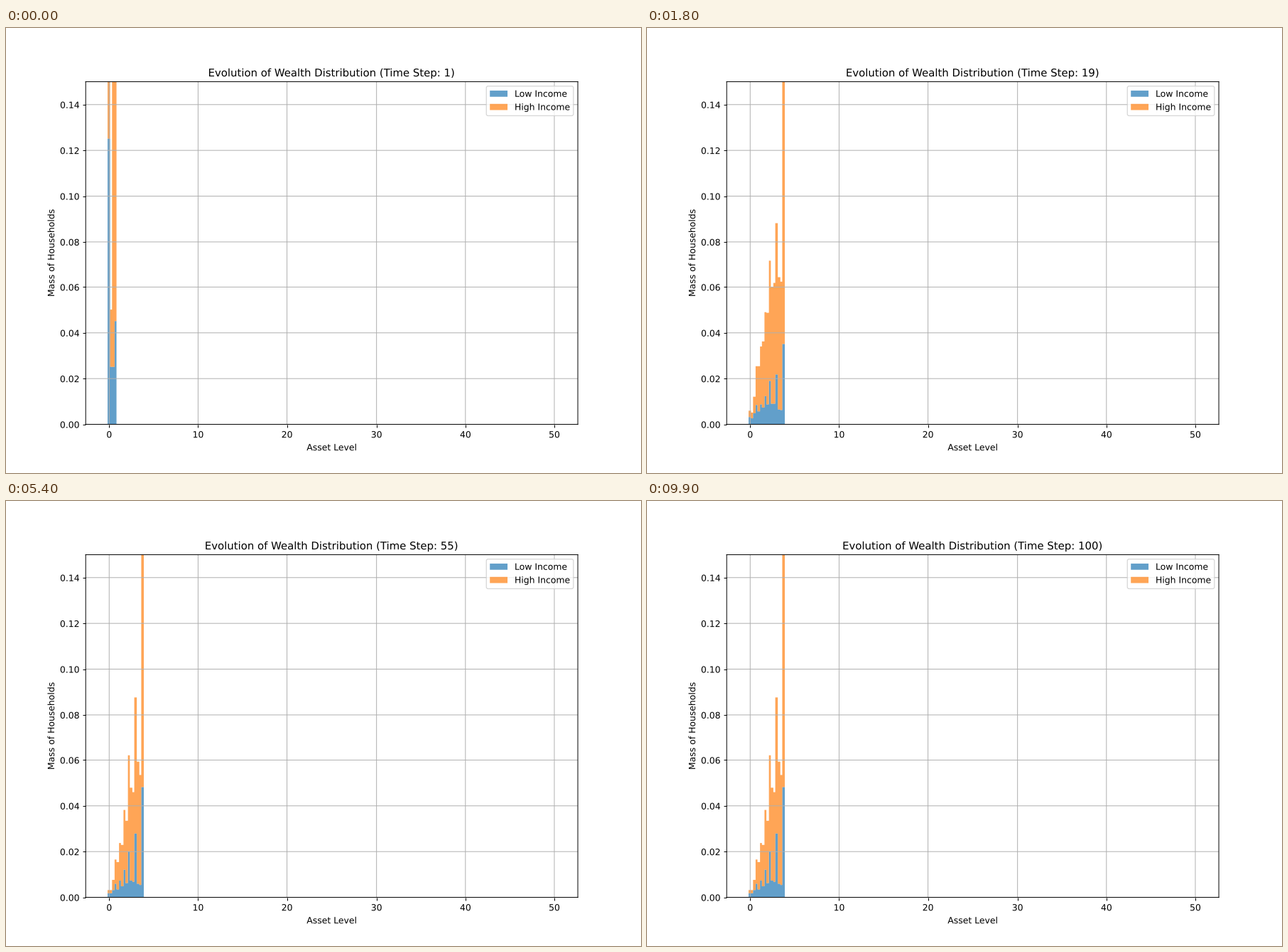
Animation, 894 px wide and 626 px high, one loop 10000 ms. Source, as a matplotlib script:

```python
import numpy as np
import matplotlib.pyplot as plt
from matplotlib.animation import FuncAnimation
from matplotlib.patheffects import Normal
from matplotlib.text import Text

W, H, DPI = 894, 626, 89.4
STEPS = 100

# Layout grid that edges and lines are aligned to before scaling to W x H
GRID_W, GRID_H = 1000, 700
LEFT, BOTTOM, AX_W, AX_H = 125, 77, 775, 539

XLIM = (-2.6375, 52.6375)
YLIM = (0, 0.15)

# Savings policies: next asset index for each current index
SAVE_LOW = np.array([0, 0, 1, 2, 3, 3, 4, 5, 6, 7, 8, 9, 9, 10, 11, 12])
SAVE_HIGH = np.array([2, 3, 3] + [min(i + 1, 15) for i in range(3, 16)])
INCOME = np.array([[0.5, 0.5], [0.1, 0.9]])  # rows: from low, from high
N = len(SAVE_LOW)


def advance(mass):
    """Move households along their savings policy, then redraw incomes."""
    saved = np.zeros_like(mass)
    np.add.at(saved[0], SAVE_LOW, mass[0])
    np.add.at(saved[1], SAVE_HIGH, mass[1])
    return INCOME.T @ saved


def simulate():
    mass = np.zeros((2, N))
    mass[:, 0] = 0.5
    mass = advance(mass)
    path = []
    for _ in range(STEPS):
        mass = advance(mass)
        path.append(mass)
    return path


def snap(value, lim, size, shift=0):
    """Align data values to whole steps of the layout grid."""
    unit = (lim[1] - lim[0]) / size
    return lim[0] + (np.round((value - lim[0]) / unit) + shift) * unit


def bar_tops(step):
    low, high = path[step]
    return [snap(v, YLIM, AX_H, 0.5) for v in (low, low + high)]


path = simulate()

plt.rcParams["font.family"] = "DejaVu Sans"
# the tiny surplus guards against the pixel size being truncated
fig = plt.figure(figsize=((W + 1e-6) / DPI, (H + 1e-6) / DPI), dpi=DPI)
# lines run through the middle of a grid cell, fills along its edges
ax = fig.add_axes([(LEFT + 0.5) / GRID_W, (BOTTOM - 0.5) / GRID_H,
                   AX_W / GRID_W, AX_H / GRID_H])

edges = snap((np.arange(N + 1) - 0.5) * 50 / 199, XLIM, AX_W, -0.5)
tops = bar_tops(0)
style = dict(fill=True, alpha=0.7, linewidth=0)
low_bars = ax.stairs(tops[0], edges, color="C0", label="Low Income", **style)
high_bars = ax.stairs(tops[1], edges, baseline=tops[0], color="C1",
                      label="High Income", **style)

ax.set(xlim=XLIM, ylim=YLIM, xlabel="Asset Level", ylabel="Mass of Households")
xticks = np.arange(0, 51, 10)
yticks = np.arange(0, 0.15, 0.02)
ax.set_xticks(snap(xticks, XLIM, AX_W), [f"{t}" for t in xticks])
ax.set_yticks(snap(yticks, YLIM, AX_H), [f"{t:.2f}" for t in yticks])
ax.grid(True)
ax.legend(loc="upper right", labelspacing=0.46)
title = ax.set_title("")

# everything keeps its fractional position, text included
for artist in fig.findobj():
    artist.set_snap(False)
    if isinstance(artist, Text):
        artist.set_path_effects([Normal()])


def update(i):
    low, total = bar_tops(i)
    low_bars.set_data(values=low)
    high_bars.set_data(values=total, baseline=low)
    title.set_text(f"Evolution of Wealth Distribution (Time Step: {i + 1})")
    return low_bars, high_bars, title


anim = FuncAnimation(fig, update, frames=STEPS, interval=100,
                     repeat=True, repeat_delay=0, blit=False)
plt.show()
```
